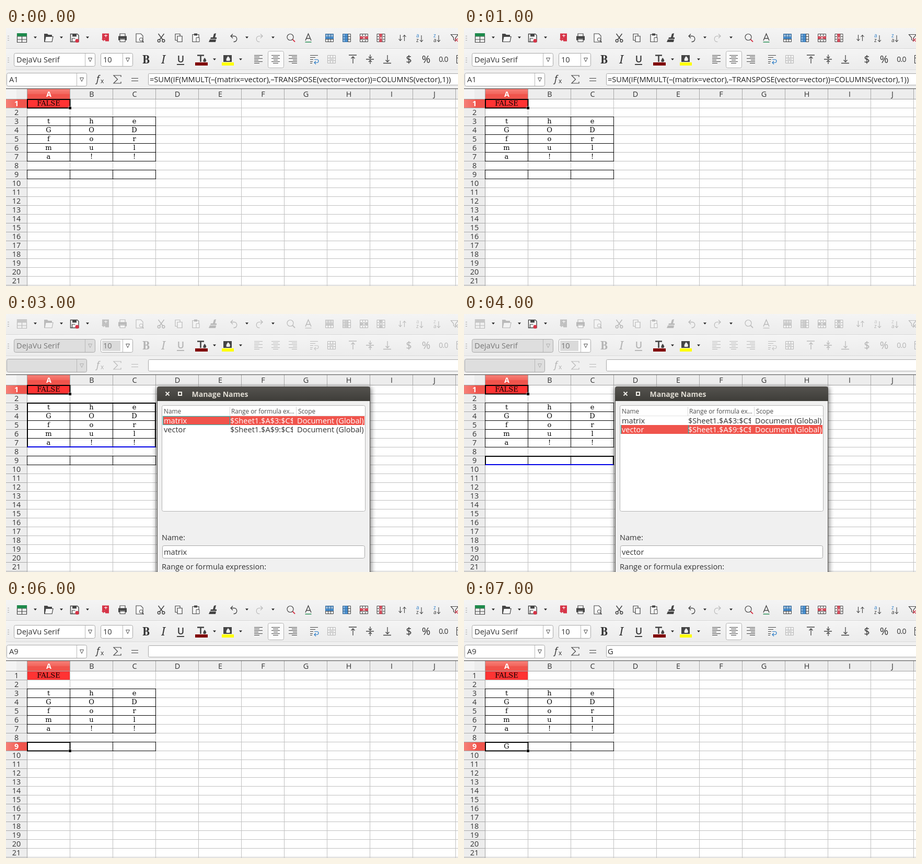
An HTML page for the animation above (8 s loop, 865 px wide and 495 px high).

```html
<!DOCTYPE html>
<html lang="en">
<head>
<meta charset="utf-8">
<title>Spreadsheet</title>
<style>
html, body { margin: 0; width: 100%; height: 100%; overflow: hidden; background: #f0f0f0; }
svg { display: block; width: 865px; height: 495px; }
text { font: 14.6px "Open Sans", "Noto Sans", sans-serif; fill: #333; white-space: pre; }
text.cell { font: 13px "DejaVu Serif", serif; fill: #000; text-anchor: middle; }
text.head { font-size: 14.4px; text-anchor: middle; }
text.small { font-size: 11.8px; fill: #4c4c4c; }
.off { opacity: .32; filter: grayscale(1); }
.hide { display: none; }
</style>
</head>
<body>
<svg id="stage" viewBox="0 0 865 495" xmlns="http://www.w3.org/2000/svg">
<defs>
  <linearGradient id="bar" x2="0" y2="1"><stop stop-color="#f4f4f4"/><stop offset="1" stop-color="#ececec"/></linearGradient>
  <linearGradient id="colRed" x2="0" y2="1"><stop stop-color="#f58078"/><stop offset=".5" stop-color="#f3655c"/><stop offset=".55" stop-color="#f0544c"/><stop offset="1" stop-color="#f0544c"/></linearGradient>
  <linearGradient id="rowRed"><stop stop-color="#f58078"/><stop offset=".5" stop-color="#f3655c"/><stop offset=".55" stop-color="#f0544c"/><stop offset="1" stop-color="#f0544c"/></linearGradient>
  <linearGradient id="title" x2="0" y2="1"><stop stop-color="#55534f"/><stop offset="1" stop-color="#3e3d39"/></linearGradient>
  <filter id="shadow" x="-10%" y="-10%" width="120%" height="120%"><feGaussianBlur stdDeviation="5"/></filter>
  <clipPath id="rangeClip"><rect x="429" y="196" width="120" height="34"/></clipPath>
</defs>
</svg>
<script>
const stage = document.getElementById("stage");
const DARK = "#454545", BLUE = "#2f7fc8", RED = "#d63447", GREEN = "#1e8a4c";

function add(parent, tag, attrs, content) {
  const el = document.createElementNS(stage.namespaceURI, tag);
  for (const k in attrs) el.setAttribute(k, attrs[k]);
  if (content !== undefined) el.textContent = content;
  parent.appendChild(el);
  return el;
}
const group = (parent, attrs = {}) => add(parent, "g", attrs);
const box = (g, x, y, width, height, fill, more = {}) =>
  add(g, "rect", { x, y, width, height, fill, ...more });
const frame = (g, x, y, w, h, fill, stroke, rx = 2) =>
  box(g, x + .5, y + .5, w - 1, h - 1, fill, { stroke, rx });
const text = (g, x, y, s, more = {}) => add(g, "text", { x, y, ...more }, s);
const line = (g, d, stroke = DARK, width = 1.2, fill = "none") =>
  add(g, "path", { d, stroke, "stroke-width": width, fill });
const area = (g, d, fill = DARK) => add(g, "path", { d, fill });
const show = (el, on) => el.classList.toggle("hide", !on);
const dim = (el, on) => el.classList.toggle("off", on);

// Toolbars
box(stage, 0, 0, 865, 117, "#f0f0f0");
box(stage, 0, 0, 865, 40, "url(#bar)");
box(stage, 0, 41, 865, 39, "url(#bar)");
for (const y of [39, 80]) {
  box(stage, 0, y, 865, 1, "#d6d6d6");
  box(stage, 0, y + 1, 865, 1, "#fafafa");
}
for (const y of [15, 19, 23, 57, 61, 65]) box(stage, 3, y, 3, 1, "#aaa");

const tools = group(stage), numbers = group(stage), fixed = group(stage);
const at = (g, x, y) => group(g, { transform: `translate(${x} ${y})` });
const arrow = (x, y) => area(fixed, `M${x - 3} ${y - 1.5}h6l-3 3.5z`, "#222");
[[56, 18], [106, 18], [156, 18], [461, 18], [511, 18], [399, 60], [449, 60]].forEach(p => arrow(...p));

function table(g, accent, part) {
  line(g, "M-7.5 -7.5h15v15h-15zM-7.5 -2.5h15M-7.5 2.5h15M-2.5 -7.5v15M2.5 -7.5v15", DARK, 1);
  if (part === "row") box(g, -8, -3, 16, 5, accent, { opacity: .85 });
  if (part === "col") box(g, -3, -8, 5, 16, accent, { opacity: .85 });
}
function page(g, w = 12, h = 15) {
  line(g, `M${-w / 2} ${-h / 2}h${w - 4}l4 4v${h - 4}h${-w}z`, DARK, 1.1, "#fafafa");
}

// File tools
let g = at(tools, 30.5, 19);
line(g, "M-9 -8.5h18v17h-18zM-9 -3h18M-9 3h18M0 -8v16", DARK, 1.2);
box(g, -9.5, -9, 19, 5, GREEN);
line(g, "M-9 -3.5h18M0 -8v5", GREEN, 1);
g = at(tools, 81.5, 19);
area(g, "M-8.5 8v-16h6l2 2h7v3h-10l-3 11z");
line(g, "M-5.5 -2.5h14l-2 10h-14z", DARK, 1.2, "#f6f6f6");
g = at(fixed, 131, 19);
line(g, "M-7.5 -7.5h13l2.5 2.5v12.5h-15.5z", DARK, 1.4, "#f6f6f6");
area(g, "M-4 -7.5h8v5h-8z");
line(g, "M-4.5 7v-6h6");
add(g, "circle", { cx: 5, cy: 5.5, r: 3.5, fill: RED });

g = at(tools, 190, 18.5);
area(g, "M-6 -8h13v15h-7v-5h-6z", RED);
line(g, "M-2 -4h6M1 -6v5", "#fff");
area(g, "M-7 3l4 -3v2h3v3h-3v2z", RED);
g = at(tools, 223, 19);
line(g, "M-5 -3v-5h10v5M-5 7.5h10v-5h-10z", DARK, 1.2, "#fafafa");
area(g, "M-8 -3.5h16v8h-3v-3h-10v3h-3z");
g = at(tools, 255.5, 19);
page(g, 13, 16);
add(g, "circle", { cx: 3, cy: 3, r: 3.2, fill: "#f6f6f6", stroke: DARK });
line(g, "M5 5.5l3 3", DARK, 1.6);
g = at(tools, 297, 19);
line(g, "M-5.5 -8l8.5 11.5M5.5 -8l-8.5 11.5", DARK, 1.5);
for (const cx of [-4.3, 4.3]) add(g, "circle", { cx, cy: 5.5, r: 2.4, fill: "none", stroke: DARK, "stroke-width": 1.5 });
g = at(tools, 330.5, 19);
line(g, "M-6.5 -7.5h9v12h-9z", DARK, 1.2, "#fafafa");
line(g, "M-2.5 -3.5h9v11h-9z", DARK, 1.2, "#fafafa");
g = at(tools, 363.5, 19);
line(g, "M-6.5 -6.5h12v14h-12z", DARK, 1.2, "#fafafa");
area(g, "M-3.5 -8.5h6v4h-6z");
line(g, "M0.5 -.5h6v8h-6z", DARK, 1, "#fafafa");
g = at(tools, 396, 19);
area(g, "M2 -8l4 -1l-2 8h3v3h-12l1 -3h4z");
area(g, "M-6 3h12l-1 5h-13z");
g = at(tools, 435.5, 19);
line(g, "M-1.5 -7.5l-4 4l4 4M-5 -3.5h6c7 0 7 11 0 11h-1", DARK, 1.3);
g = at(group(fixed, { class: "off" }), 485.5, 19);
line(g, "M1.5 -7.5l4 4l-4 4M5 -3.5h-6c-7 0 -7 11 0 11h1", DARK, 1.2);

// Search, spelling, rows and columns, sorting
g = at(tools, 544.5, 19);
add(g, "circle", { cx: -.5, cy: -1.5, r: 6, fill: "none", stroke: DARK, "stroke-width": 1.2 });
line(g, "M4 3l4.5 4.5", RED, 1.8);
g = at(tools, 578.5, 19);
line(g, "M-5.5 5l5.5 -13l5.5 13M-3.5 1h7", DARK, 1.4);
line(g, "M-6 8h12", GREEN, 1.4);
[[619, BLUE, "row"], [652, BLUE, "col"], [685, RED, "row"], [717.5, RED, "col"]].forEach(([x, c, part], i) => {
  g = at(tools, x, 19);
  table(g, c, part);
  if (i < 2) box(g, -8, -8, i ? 6 : 16, i ? 16 : 4, BLUE, { opacity: .6 });
  else line(g, "M-3 -3l6 6M3 -3l-6 6", "#fff", 1);
});
g = at(tools, 758.5, 19);
line(g, "M-4 -6v11M-7 2l3 3.5l3 -3.5M4 6v-11M1 -2l3 -3.5l3 3.5", DARK, 1.1);
[[791.5, "a", "z"], [824.5, "z", "a"]].forEach(([x, a, b]) => {
  g = at(tools, x, 19);
  text(g, -6.5, -1, a, { style: `font-size:10px;fill:${BLUE}` });
  text(g, -6.5, 8, b, { style: "font-size:10px" });
  line(g, "M3.5 -5v12M.5 4l3 3.5l3 -3.5", DARK, 1.1);
});
g = at(tools, 858, 19);
line(g, "M-6.5 -6.5h14l-5 6v6l-4 -2v-4z", DARK, 1.2);
line(g, "M1 1l6 6M7 1l-6 6", RED, 1.2);

// Formatting tools
const style = (size, extra) => ({ "text-anchor": "middle", style: `font-size:${size}px;${extra}` });
const serif = 'font-family:"Noto Serif",serif;';
text(tools, 268, 67.5, "B", style(21, serif + "font-weight:700"));
text(tools, 301, 67.5, "I", style(21, serif + "font-style:italic"));
text(tools, 334.5, 66, "U", style(18, "font-weight:600"));
box(tools, 327, 69, 14, 2, DARK);
line(fixed, "M366 52.5h13M372.5 52v13", DARK, 2.6);
area(fixed, "M380 57q5 5 2.500 7.500q-2.500 1.500 -5 0q-1 -2 2.500 -7.500z");
box(fixed, 362, 66, 24, 6, "#800000");
box(fixed, 416, 52, 16, 13, DARK);
area(fixed, "M425 54q6 6 3 9h-6q-2 -3 3 -9z", "#eee");
box(fixed, 413, 66, 23, 6, "#ffff00");

function lines(x, widths, shift) {
  widths.forEach((w, i) => box(tools, x + shift * (16 - w), 52 + i * 3, w, 1, DARK));
}
const pressed = frame(stage, 501, 44, 31, 33, "#fbfbfb", "#b4b4b4", 3);
stage.insertBefore(pressed, tools);
const widths = [16, 10, 16, 8, 16, 10];
lines(475, widths, 0);
lines(508, widths, .5);
lines(541, widths, 1);
g = at(tools, 590, 60);
line(g, "M-8 -7.500h15M-8 -3.500h10M-8 .5h6M-8 4.500h5M-8 7.500h4");
line(g, "M0 .5h5c4 0 4 6 0 6h-5M3 3.500l-3 3l3 3", BLUE, 1.2);
const merge = at(fixed, 623, 60);
table(merge);
box(merge, -7, -2, 14, 4, "#eee");
line(merge, "M-4 0h8");
merge.classList.add("off");
g = at(tools, 664, 60);
line(g, "M-8 -8h15M0 8v-13M-3.500 -1.500l3.500 -3.500l3.500 3.500", DARK, 1.3);
g = at(tools, 697, 60);
line(g, "M-8 0h15M0 -9v6M-3 -5l3 3l3 -3M0 9v-6M-3 5l3 -3l3 3", DARK, 1.3);
g = at(tools, 730, 60);
line(g, "M-8 7.500h15M0 -8v13M-3.500 1.500l3.500 3.500l3.500 -3.500", DARK, 1.3);
text(numbers, 771, 67, "$", style(20, ""));
text(numbers, 804, 67, "%", style(20, ""));
text(numbers, 837, 65, "0.0", style(14, "letter-spacing:-.8px"));
line(numbers, "M866 52.500h-3.500v15h3.500M863 57.500h3");

// Font boxes
const down = (g, x, y) => line(g, `M${x - 3.5} ${y - 3.5}h7l-3.500 7z`, "#555", 1);
const fontBox = group(stage), sizeBox = group(stage);
const fontBack = frame(fontBox, 15, 48, 156, 26, "#fff", "#a8a8a8", 3);
box(fontBox, 151, 49, 1, 24, "#b8b8b8");
const fontName = text(fontBox, 20, 66, "DejaVu Serif");
const fontArrow = down(fontBox, 161, 61);
frame(sizeBox, 181, 48, 62, 26, "#fff", "#a8a8a8", 3);
box(sizeBox, 223, 49, 1, 24, "#b8b8b8");
const sizeBack = box(sizeBox, 184, 51, 35, 20, "#dadada");
const sizeText = text(sizeBox, 186, 66, "10");
down(sizeBox, 233, 61);

// Formula bar
const nameBack = frame(stage, 1, 86, 154, 26, "#fff", "#a8a8a8", 3);
box(stage, 135, 87, 1, 24, "#b8b8b8");
const nameText = text(stage, 6, 104, "");
const nameArrow = down(stage, 145, 99);
const fxTools = group(stage);
text(fxTools, 173, 104, "f", { style: "font-size:18px;font-style:italic" });
text(fxTools, 181, 106, "x", { style: "font-size:12px" });
line(fxTools, "M220 94v-3h-14l7.500 7.500l-7.500 7.500h14v-3", DARK, 1.2);
line(fxTools, "M240 96.500h13M240 101.500h13", DARK, 1.2);
frame(stage, 272, 87, 600, 23, "#fff", "#a8a8a8", 2);
const formula = text(stage, 275, 104, "", { style: "fill:#222" });

// Sheet
const colX = i => 40 + 82 * i, rowY = n => 136 + 17 * n;
box(stage, 0, 116, 865, 379, "#fff");
box(stage, 0, 117, 865, 19, "#ededed");
box(stage, 0, 117, 40, 378, "#ededed");
box(stage, 0, 117, 20, 19, "#f4f4f4");
for (let n = 1; n <= 21; n++) {
  box(stage, 41, rowY(n), 824, 1, "#c0c0c0");
  box(stage, 0, rowY(n), 40, 1, "#a6a6a6");
}
for (let i = 1; i <= 10; i++) {
  box(stage, colX(i), 137, 1, 358, "#c0c0c0");
  box(stage, colX(i), 117, 1, 19, "#a6a6a6");
}
box(stage, 0, 116, 865, 1, "#4a4a4a");
box(stage, 0, 136, 865, 1, "#a0a0a0");
box(stage, 40, 117, 1, 378, "#a0a0a0");
box(stage, 41, 117, 81, 19, "url(#colRed)");
const rowRed = box(stage, 0, 137, 40, 16, "url(#rowRed)");
[..."ABCDEFGHIJ"].forEach((c, i) => text(stage, colX(i) + 42, 132, c,
  { class: "head", style: i ? "" : "fill:#fff;font-weight:700" }));
const rowLabels = [];
for (let n = 1; n <= 21; n++) rowLabels[n] = text(stage, 20, rowY(n) - 3, n, { class: "head" });

box(stage, 41, 137, 81, 16, "#ff3333");
const cell = (i, n, s) => text(stage, colX(i) + 41.5, rowY(n) - 4, s, { class: "cell" });
cell(0, 1, "FALSE");
["the", "GOD", "for", "mul", "a!!"].forEach((word, r) => [...word].forEach((c, i) => cell(i, r + 3, c)));
const typed = cell(0, 9, "");
for (const [first, last] of [[3, 7], [9, 9]]) {
  for (let n = first - 1; n <= last; n++) box(stage, 40, rowY(n), 247, 1, "#000");
  for (let i = 0; i < 4; i++) box(stage, colX(i), rowY(first - 1), 1, 17 * (last - first + 1) + 1, "#000");
}
function rangeMark(first, last) {
  const g = group(stage), top = rowY(first - 1), h = rowY(last) - top;
  box(g, 40, top, 247, 2, "#000");
  box(g, 40, top, 2, h, "#000");
  box(g, 285, top, 2, h, "#000");
  box(g, 41, top + h - 1, 245, 2, "#0000e6");
  return g;
}
const marks = [rangeMark(3, 7), rangeMark(9, 9)];
const cursor = group(stage);
line(cursor, "M41 137h81.500v16.500h-81.500z", "#000", 2);
box(cursor, 119.500, 150.500, 6, 6, "#fff");
box(cursor, 120, 151, 5, 5, "#000");

// Dialog
const dialog = group(stage);
box(dialog, 288, 141, 411, 380, "#000", { opacity: .5, filter: "url(#shadow)" });
box(dialog, 289, 139, 408, 380, "#f0f0f0", { rx: 4 });
area(dialog, "M289 167v-24q0 -4 4 -4h400q4 0 4 4v24z", "url(#title)");
box(dialog, 289, 167, 1, 328, "#55534f");
box(dialog, 696, 167, 1, 328, "#55534f");
line(dialog, "M305.500 149.500l7 7M312.500 149.500l-7 7", "#f0eee8", 1.9);
line(dialog, "M330 150h6v6h-6z", "#f0eee8", 2);
text(dialog, 355.5, 159, "Manage Names", { style: "font-size:14px;font-weight:700;fill:#dfdbd2" });
frame(dialog, 298, 175, 390, 204, "#fff", "#b4b4b4", 3);
["Name", "Range or formula ex...", "Scope"].forEach((s, i) => text(dialog, [302, 431, 559][i], 191, s, { class: "small" }));
for (const x of [428, 555]) box(dialog, x, 178, 1, 17, "#d8d8d8");
box(dialog, 299, 195, 388, 1, "#e2e2e2");
const pick = box(dialog, 300, 196, 386, 17, "#f0544c");
const focusBox = line(dialog, "M300.500 196.500h128v16h-128z", "#1fb5ad", 1.2);
const focusBars = line(dialog, "M300.500 213v17M429.500 213v17", "#1fb5ad", 1.2);
const names = ["matrix", "vector"];
const listRows = names.map((s, i) => {
  const g = group(dialog), y = 210 + 17 * i;
  return [text(g, 302, y, s),
    text(group(g, { "clip-path": "url(#rangeClip)" }), 429, y, `$Sheet1.$A$${i ? 9 : 3}:$C$`),
    text(g, 557, y, "Document (Global)")];
});
text(dialog, 298, 434, "Name:");
frame(dialog, 299, 444, 388, 25, "#fff", "#a8a8a8", 3);
const nameField = text(dialog, 302, 462, "");
text(dialog, 298, 490, "Range or formula expression:");

const SUM = "=SUM(IF(MMULT(–(matrix=vector),–TRANSPOSE(vector=vector))=COLUMNS(vector),1))";
// One entry per hard change
const steps = [
  { from: 0, row: 1, formula: SUM },
  { from: 3000, row: 1, pick: 0 },
  { from: 4000, row: 1, pick: 1 },
  { from: 5000, row: 1, formula: SUM, late: true },
  { from: 6000, row: 9 },
  { from: 7000, row: 9, formula: "G", typed: "G" }
];

function draw(t) {
  const s = steps.filter(e => e.from <= t).pop();
  const open = s.pick !== undefined;
  dim(tools, open);
  dim(numbers, open || !!s.late);
  for (const el of [fontName, fontArrow, sizeText, nameArrow, fxTools]) dim(el, open);
  fontName.style.opacity = sizeText.style.opacity = open ? .6 : 1;
  fontBack.setAttribute("fill", open ? "#dedede" : "#fff");
  nameBack.setAttribute("fill", open ? "#dedede" : "#fff");
  show(sizeBack, open);
  show(pressed, !open);
  nameText.textContent = open ? "" : "A" + s.row;
  formula.textContent = s.formula || "";
  typed.textContent = s.typed || "";
  const dy = 17 * (s.row - 1);
  rowRed.setAttribute("y", 137 + dy);
  cursor.setAttribute("transform", `translate(0 ${dy})`);
  for (const n of [1, 9]) {
    rowLabels[n].style.fill = n === s.row ? "#fff" : "";
    rowLabels[n].style.fontWeight = n === s.row ? 700 : 400;
  }
  marks.forEach((m, i) => show(m, s.pick === i));
  show(dialog, open);
  if (!open) return;
  pick.setAttribute("y", 196 + 17 * s.pick);
  show(focusBox, s.pick === 0);
  show(focusBars, s.pick === 1);
  listRows.forEach((row, i) => row.forEach(el => el.style.fill = i === s.pick ? "#fff" : "#333"));
  nameField.textContent = names[s.pick];
}

const start = performance.now();
function tick() {
  draw((performance.now() - start) % 8000);
  requestAnimationFrame(tick);
}
tick();
</script>
</body>
</html>
```
